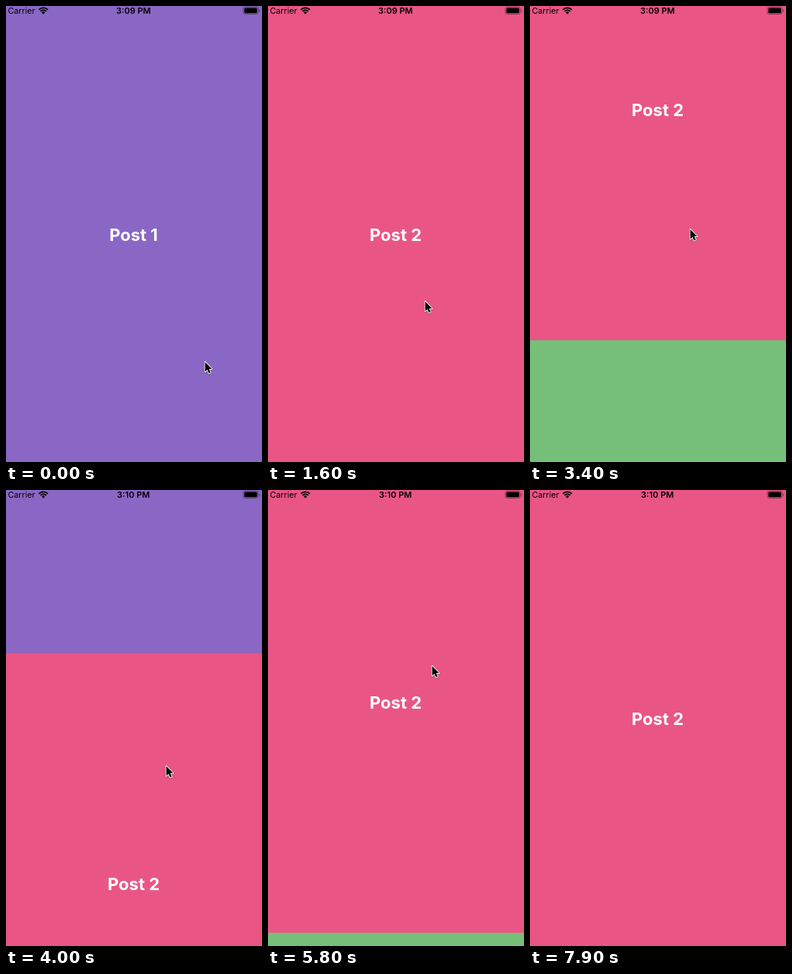
Write an HTML page with a canvas that moves like this. It is 330 px wide and 588 px high and loops after 8 s.

```html
<!DOCTYPE html>
<html lang="en">
<head>
<meta charset="utf-8">
<title>Paged posts</title>
<style>
  html, body { margin: 0; width: 100%; height: 100%; overflow: hidden; background: #f9fafa; }
  canvas { display: block; width: 330px; height: 588px; }
</style>
</head>
<body>
<canvas id="stage"></canvas>
<script>
const W = 330, H = 588, LOOP = 8000, STEP = 100;
const PAGE = 595, TOP = -3;
const DRAG = 200, SETTLE = 500, TRAVEL = 300, PULL = 105;
const FONT = 'Inter, "Liberation Sans", sans-serif';
const PAPER = '#f9fafa';
const posts = [
  { name: 'Post 1', color: '#8a67c4' },
  { name: 'Post 2', color: '#e95685' },
  { name: 'Post 3', color: '#76bf79' }
];

// Each swipe starts at a time, lands on a page and lets go at x, y.
// A stretch is a pull past the end of the list.
const swipes = [
  { at: -1000, page: 0, x: 256, y: 458 },
  { at: 500, page: 1, x: 202, y: 380 },
  { at: 2000, page: 2, x: 205, y: 300 },
  { at: 3045, page: 1, x: 206, y: 287 },
  { at: 3760, page: 0, x: 206, y: 355 },
  { at: 4500, page: 0, x: 206, y: 456, stretch: -122 },
  { at: 5050, page: 1, x: 210, y: 240 },
  { at: 5760, page: 2, x: 211, y: 142 },
  { at: 6550, page: 2, x: 223, y: 186, stretch: 16.5 },
  { at: 7050, page: 1, x: 226, y: 360 },
  { at: 7750, page: 1, x: 350, y: 440 }
];

swipes.forEach((s, i) => {
  s.from = i ? swipes[i - 1].page : s.page;
  s.pull = s.stretch || Math.sign(s.page - s.from) * PULL;
  s.finger = s.stretch ? s.pull * 2 : s.pull; // the ends of the list resist
});

const canvas = document.getElementById('stage');
const ctx = canvas.getContext('2d');
const ratio = window.devicePixelRatio || 1;
canvas.width = W * ratio;
canvas.height = H * ratio;
ctx.scale(ratio, ratio);

const clamp = u => Math.min(1, Math.max(0, u));
const mix = (a, b, u) => a + (b - a) * u;
const smooth = u => u * u * (3 - 2 * u);

function scrollAt(t, s) {
  const pulled = s.from * PAGE + s.pull * clamp((t - s.at) / DRAG);
  const u = clamp((t - s.at - DRAG) / SETTLE);
  return mix(s.page * PAGE, pulled, (1 - u) ** 3);
}

function pointerAt(t, s, next) {
  const y = s.y + s.finger * (1 - clamp((t - s.at) / DRAG));
  if (!next) return [s.x, y];
  const u = smooth(clamp((t - next.at + TRAVEL) / TRAVEL));
  return [mix(s.x, next.x, u), mix(y, next.y + next.finger, u)];
}

function text(str, x, y, size, weight, color, align = 'center') {
  ctx.font = `${weight} ${size}px ${FONT}`;
  ctx.textAlign = align;
  ctx.fillStyle = color;
  ctx.fillText(str, x, y);
}

function roundRect(x, y, w, h, r) {
  ctx.beginPath();
  ctx.roundRect(x, y, w, h, r);
}

function drawPosts(scroll) {
  ctx.fillStyle = PAPER;
  ctx.fillRect(0, 0, W, H);
  posts.forEach((post, i) => {
    const y = TOP + i * PAGE - scroll;
    if (y > H || y + PAGE < 0) return;
    // later pages cover the overlap, so no seam shows
    ctx.fillStyle = post.color;
    ctx.fillRect(0, y, W, PAGE + (i < posts.length - 1 ? 1 : 0));
    text(post.name, 164.5, y + 306, 22, 700, '#fff');
  });
}

function drawWifi(x, y) {
  const a = Math.PI / 4, mid = -Math.PI / 2;
  ctx.strokeStyle = ctx.fillStyle = '#000';
  ctx.lineWidth = 1.9;
  for (const r of [8.2, 5.2]) {
    ctx.beginPath();
    ctx.arc(x, y, r, mid - a, mid + a);
    ctx.stroke();
  }
  ctx.beginPath();
  ctx.moveTo(x, y);
  ctx.arc(x, y, 3.1, mid - a, mid + a);
  ctx.fill();
}

function drawBattery() {
  ctx.strokeStyle = 'rgba(0,0,0,.38)';
  ctx.lineWidth = 1;
  roundRect(305.8, 1.3, 19.4, 9.2, 2.6);
  ctx.stroke();
  ctx.fillStyle = '#000';
  roundRect(307.2, 2.6, 16.6, 6.7, 1.5);
  ctx.fill();
  ctx.fillStyle = 'rgba(0,0,0,.4)';
  roundRect(326.2, 4.4, 1.2, 3.2, [0, 1, 1, 0]);
  ctx.fill();
}

function drawStatus(t) {
  text('Carrier', 2.5, 10.3, 10.7, 400, '#000', 'left');
  text(t < 4000 ? '3:09 PM' : '3:10 PM', 164.3, 10.3, 11, 600, '#000');
  drawWifi(48.2, 10.6);
  drawBattery();
}

function drawPointer([x, y]) {
  const shape = [[0, 0], [0, 14], [3.2, 11.1], [5.5, 16.3], [7.9, 15.3], [5.7, 10.2], [9.9, 10.2]];
  ctx.save();
  ctx.translate(x + 0.6, y + 0.9);
  ctx.scale(0.9, 0.9);
  ctx.beginPath();
  shape.forEach(([px, py]) => ctx.lineTo(px, py));
  ctx.closePath();
  ctx.lineJoin = 'round';
  ctx.strokeStyle = '#fff';
  ctx.lineWidth = 2;
  ctx.shadowColor = 'rgba(0,0,0,.3)';
  ctx.shadowBlur = 2 * ratio;
  ctx.shadowOffsetY = ratio;
  ctx.stroke();
  ctx.shadowColor = 'transparent';
  ctx.fillStyle = '#000';
  ctx.fill();
  ctx.restore();
}

function draw(now) {
  const t = Math.floor((now % LOOP) / STEP) * STEP;
  const i = swipes.findLastIndex(s => s.at <= t);
  drawPosts(scrollAt(t, swipes[i]));
  drawStatus(t);
  drawPointer(pointerAt(t, swipes[i], swipes[i + 1]));
}

const start = performance.now();
function tick() {
  draw(performance.now() - start);
  requestAnimationFrame(tick);
}
tick();
</script>
</body>
</html>
```
